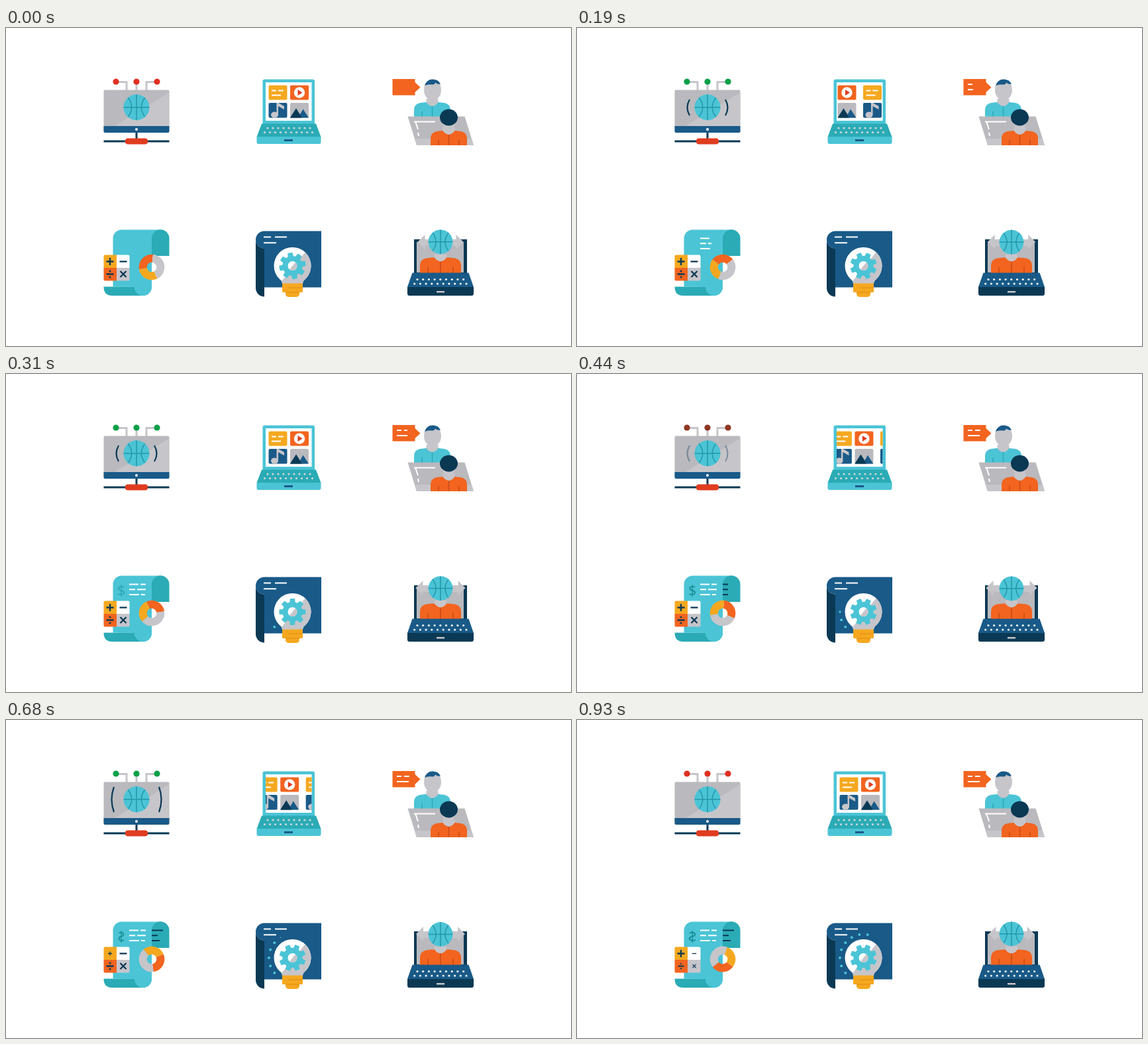
Recreate the animation shown at these times as an HTML page with a canvas. Size 853 px wide and 480 px high, loop 990 ms.

```html
<!DOCTYPE html>
<html lang="en">
<head>
<meta charset="utf-8">
<title>Learning icons</title>
<style>
  html, body { margin: 0; height: 100%; overflow: hidden; background: #fff; }
  canvas { display: block; }
</style>
</head>
<body>
<canvas id="stage" width="853" height="480"></canvas>
<script>
const ctx = document.getElementById('stage').getContext('2d');
const TEAL = '#4bc4d6', SEA = '#2aabb5', NAVY = '#195a88', INK = '#0b3954';
const ORANGE = '#f2641f', RUST = '#c94a18', YELLOW = '#f5a81f', RED = '#e03c20';
const GREY = '#b9b9be', SILVER = '#c6c5ca', WHITE = '#fff';
const LOOP = 990;
const STEPS = [0, 130, 190, 250, 310, 440, 500, 560, 620, 680, 810, 870, 930];
const { PI, sin, cos } = Math;

const clamp = (v, lo = 0, hi = 1) => Math.min(hi, Math.max(lo, v));
const ramp = (t, from, to) => clamp((t - from) / (to - from));
const smooth = u => u * u * (3 - 2 * u);

function fill(color, d) {
  ctx.fillStyle = color;
  ctx.fill(new Path2D(d));
}
function stroke(color, width, d) {
  ctx.strokeStyle = color;
  ctx.lineWidth = width;
  ctx.stroke(new Path2D(d));
}
function box(color, x, y, w, h, r = 0) {
  ctx.fillStyle = color;
  ctx.beginPath();
  ctx.roundRect(x, y, w, h, r);
  ctx.fill();
}
function oval(color, x, y, rx, ry = rx) {
  ctx.fillStyle = color;
  ctx.beginPath();
  ctx.ellipse(x, y, rx, ry, 0, 0, 2 * PI);
  ctx.fill();
}
function group(draw) {
  ctx.save();
  draw();
  ctx.restore();
}
function clip(d) {
  ctx.clip(new Path2D(d));
}
function wipe(edge, draw) {
  group(() => { clip(`M0 0H${edge}V480H0z`); draw(); });
}

function ball(x, y, r) {
  group(() => {
    ctx.translate(x, y);
    oval(TEAL, 0, 0, r);
    const k = r * 0.65, c = r * 0.74;
    stroke('#2497ab', 1.5, `M0-${r}V${r}M-${r} 0H${r}
      M-${k}-${c}Q-${r * 0.1} 0-${k} ${c}M${k}-${c}Q${r * 0.1} 0 ${k} ${c}`);
  });
}
function bust(x, top, bottom, half, color, seam) {
  fill(color, `M${x - half} ${bottom}V${top + 12}q0-9 9-11l9-1h${2 * half - 36}l9 1q9 2 9 11V${bottom}z`);
  fill(SILVER, `M${x - 9} ${top - 5}h18v5q-3 5-9 6-6-1-9-6z`);
  const arm = half - 12;
  stroke(seam, 1.5, `M${x - arm} ${top + 14}V${bottom}M${x + arm} ${top + 14}V${bottom}M${x} ${top + 6}V${bottom}`);
}
function keys(color, x, y, count, gap, shift) {
  for (let row = 0; row < 2; row++)
    for (let i = 0; i < count + row; i++)
      oval(color, x + i * gap - row * shift, y + row * 6.5, 1.6);
}

function monitor(t) {
  const on = t < 500 ? ramp(t, 60, 190) * (1 - ramp(t, 340, 500))
                     : ramp(t, 500, 650) * (1 - ramp(t, 810, 930));
  stroke(SILVER, 3, 'M166 81.5H182V95M197 81V95M228 81.5H212V95');
  const mix = (a, b, u) => Math.round(a + (b - a) * u);
  const lamp = `rgb(${mix(224, 10, on)},${mix(48, 160, on ** 3)},${mix(32, 72, on ** 3)})`;
  for (const x of [166, 197, 228]) oval(lamp, x, 81, 4.6);

  box(GREY, 147.5, 93.5, 99, 64, 2);
  fill(SILVER, 'M246.5 97V148H164z');
  fill(NAVY, 'M147.5 148h99v8q0 2-2 2h-95q-2 0-2-2z');
  oval(WHITE, 197, 153, 2);
  ball(197, 119.7, 19.5);
  group(() => {
    ctx.globalAlpha = on;
    const d = t < 500 ? 27 : 34, h = t < 500 ? 12 : 19;
    stroke(INK, 2.2, `M${197 - d} ${120 - h}q-7 ${h} 0 ${2 * h}M${197 + d} ${120 - h}q7 ${h} 0 ${2 * h}`);
  });
  stroke(INK, 3, 'M197 158V168M147.5 171H246.5');
  box(RED, 180, 166.5, 34, 9, 4);
}

function tileLeft() {
  box(YELLOW, 396.5, 86.5, 28, 22, 2);
  stroke(WHITE, 2, 'M401 94.5h7M411 94.5h8M401 101.5h14');
  box(NAVY, 396.5, 113, 28, 22.5, 2);
  oval(SILVER, 405.5, 131, 5.5, 4.5);
  fill(SILVER, 'M408.5 113h2.5l9 5v5l-9-5v13h-2.5z');
}
function tileRight() {
  box(ORANGE, 429, 86.5, 28, 22, 2);
  oval(WHITE, 443, 97.5, 8.2);
  fill(RED, 'M440.5 93l7 4.5-7 4.5z');
  box(GREY, 429, 113, 28, 22.5, 2);
  fill(NAVY, 'M429 135.5l9-14 6 9 4.5-8 8.5 13z');
  fill(INK, 'M429 135.5l9-14 8.5 14z');
}
function gallery(t) {
  box(TEAL, 387.5, 77.5, 78.5, 72, 3);
  box(WHITE, 392, 82, 69.5, 58);
  const slide = [[70, 310], [404, 560], [630, 800]]
    .reduce((sum, [from, to]) => sum + smooth(ramp(t, from, to)), 0) % 1 * 71;
  group(() => {
    clip('M392 82h69.5v58H392z');
    for (const shift of [0, 71]) group(() => {
      ctx.translate(shift - slide, 0);
      tileLeft();
      tileRight();
    });
  });
  fill(SEA, 'M386 144.5h82l7.5 20h-97z');
  box(TEAL, 378.5, 164, 97, 11, [0, 0, 3, 3]);
  keys('#d4d6d9', 395, 151, 9, 8, 4.5);
  box(NAVY, 420, 168, 13, 3);
}

function meeting(t) {
  fill(ORANGE, 'M583.5 77h34v5l8 7.5-8 7.5v4.5h-34z');
  wipe(585 + t * 0.068, () => stroke(WHITE, 2, 'M590 85h7M601 85h8M590 93h18'));

  bust(643.5, 112, 136, 27.5, TEAL, SEA);
  oval(SILVER, 644, 93.5, 13, 16);
  fill(NAVY, 'M632 87q3-9.5 12-9.5 9 0 12 7-4 1-8-2-1 3-4 3-8-1-12 1.5z');

  fill(GREY, 'M606.5 133.5h86l13.5 43.5h-86z');
  fill(SILVER, 'M617 167h86l3 10h-86z');
  stroke(WHITE, 2, 'M616 141.5h32M618 141l4 12M622 158l1 5');

  bust(668.5, 155, 177, 27.5, ORANGE, RUST);
  oval(SILVER, 668.5, 142, 10, 11);
  oval(INK, 668.5, 135, 13.5, 12.5);
}

function sign(x, y, d, start, t) {
  group(() => {
    ctx.translate(x, y);
    const s = 1 - 0.45 * sin(PI * ramp(t, start, start + 400));
    ctx.scale(s, s);
    stroke(INK, 2.3, d);
  });
}
function budget(t) {
  fill(SEA, 'M147.5 390.5h50l10 13.5h-47q-13 0-13-13.5z');
  fill(TEAL, 'M161.5 390.5V317.5a13 13 0 0 1 13-13H234l-14 14V391a13 13 0 0 1-26 0z');
  fill(TEAL, 'M194 390.5a13 13.5 0 0 0 13 13.5 13 13.5 0 0 0 13-13.5z');
  fill(SEA, 'M220 344V317.5a13 13 0 0 1 26.5 0V344z');

  wipe(184 + t * 0.1, () => {
    stroke(WHITE, 2, 'M186 317.5h14M203 317.5h8M186 325.2h9M198 325.2h13M186 333h15M204 333h6');
    stroke(INK, 2, 'M220 317.5h17M220 325.2h9M220 333h12');
  });
  group(() => {
    ctx.globalAlpha = ramp(t, 190, 430);
    ctx.translate(174, 325.5);
    ctx.scale(cos(PI * ramp(t, 400, 740)), 1);
    ctx.font = '22px "Noto Sans", sans-serif';
    ctx.textAlign = 'center';
    ctx.fillStyle = '#178b94';
    ctx.fillText('$', 0, 8);
  });

  const turn = t * 0.244 - 90;
  [[ORANGE, -100, 6], [SILVER, 6, 154], [YELLOW, 154, 260]].forEach(([color, from, to]) => {
    ctx.strokeStyle = color;
    ctx.lineWidth = 12;
    ctx.beginPath();
    ctx.arc(220, 361, 13.3, (from + turn) * PI / 180, (to + turn) * PI / 180);
    ctx.stroke();
  });

  box(YELLOW, 147.5, 342.5, 19.5, 19.5, [2, 0, 0, 0]);
  box(WHITE, 167, 342.5, 19.5, 19.5, [0, 2, 0, 0]);
  box(ORANGE, 147.5, 362, 19.5, 19.5, [0, 0, 0, 2]);
  box(SILVER, 167, 362, 19.5, 19.5, [0, 0, 2, 0]);
  sign(157, 352.5, 'M-5.5 0h11M0-5.5v11', 480, t);
  sign(177, 352.5, 'M-5.5 0h11', 680, t);
  sign(157, 371.5, 'M-5.5 0h11M-1.3-4.5h2.6M-1.3 4.5h2.6', 870, t);
  sign(177, 371.5, 'M-4.5-4.5l9 9M4.5-4.5l-9 9', 780, t);
}

function blueprint(t) {
  fill(INK, 'M377 319.5a13 13 0 0 0 13 13V405.5a13 13 0 0 1-13-13z');
  fill(NAVY, 'M390 306.5H476V391.5H390V332.5a13 13 0 0 1 0-26z');
  stroke(WHITE, 2, 'M389 315.5h11M406 315.5h18M389 324.3h19');

  const shown = 1 + (t - 300) / 89;
  for (let i = 0; i < 8; i++) {
    const a = (140 + 20 * i) * PI / 180;
    oval(TEAL, 432.5 + 35.5 * cos(a), 359 + 35.5 * sin(a), 2 * clamp((shown - i) * 1.5));
  }

  const bulb = 'M417 386q0-4-4-7a28 28 0 1 1 39 0q-4 3-4 7z';
  fill(WHITE, bulb);
  group(() => {
    clip(bulb);
    fill(SILVER, 'M456 333L412 387h60V333z');
  });
  group(() => {
    ctx.translate(432.5, 359);
    ctx.rotate((t - 560) * 0.18 * PI / 180);
    for (let i = 0; i < 8; i++) {
      fill(TEAL, 'M-4.5-12l1-8h7l1 8z');
      ctx.rotate(PI / 4);
    }
    oval(TEAL, 0, 0, 15);
  });
  oval(WHITE, 432.5, 359, 7);
  fill(SILVER, 'M437 353.6a7 7 0 0 1-9 10.8z');
  box(YELLOW, 417, 385.5, 31, 13.5, 1);
  fill(YELLOW, 'M422 399h21v3q-1 4-5 4h-11q-4 0-5-4z');
  stroke('#e08a17', 1.2, 'M426 392h22M422 399h21');
}

function lecture(t) {
  const sway = cos(2 * PI * (t + 30) / LOOP);
  box(INK, 616, 319, 80, 54);
  box(GREY, 620, 323, 71, 46);
  const out = 36.5 - 2 * sway;
  fill(SILVER, `M${656 - out} 323l11-11v7h${2 * out - 22}v-7l11 11-11 11v-5h${22 - 2 * out}v5z`);
  bust(656, 346.5, 370, 31, ORANGE, RUST);
  ball(656, 323.3 - 0.5 * sway, 18.4);
  fill(NAVY, 'M613.5 369.5h85l7.5 21.5H606z');
  box(INK, 606, 391, 100, 13, [0, 0, 3, 3]);
  keys(WHITE, 621, 379.5, 9, 8.7, 4.3);
  box(SILVER, 650, 397, 12, 2.5);
}

function frame(now) {
  const clock = now % LOOP;
  const t = STEPS.findLast(step => step <= clock) ?? 0;
  box(WHITE, 0, 0, 853, 480);
  for (const icon of [monitor, gallery, meeting, budget, blueprint, lecture]) icon(t);
  requestAnimationFrame(frame);
}
frame(0);
</script>
</body>
</html>
```
